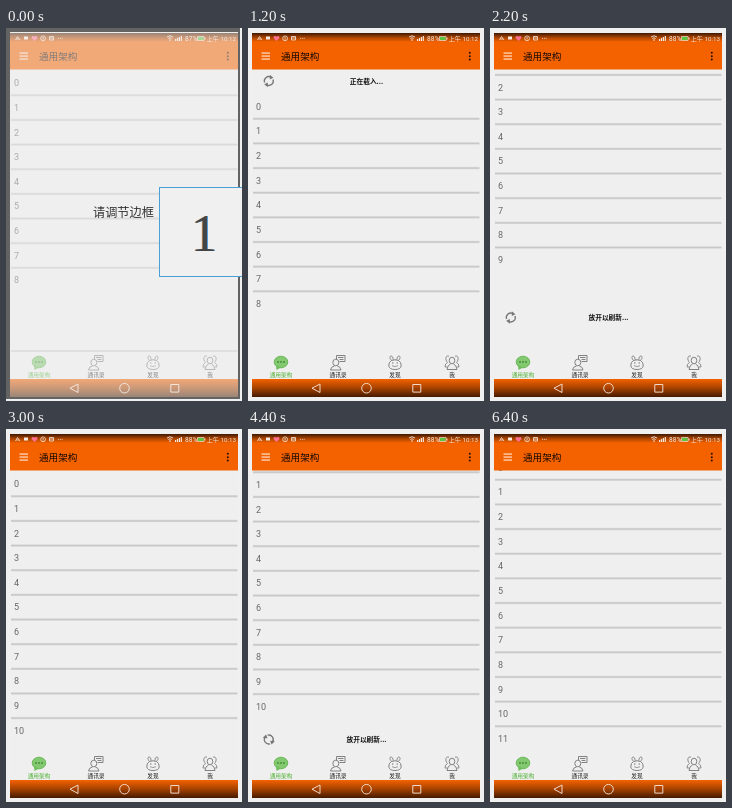
Animation, 236 px wide and 373 px high, one loop 7.2 s. Source, as an HTML page with a canvas:

```html
<!DOCTYPE html>
<html lang="zh">
<head>
<meta charset="utf-8">
<style>
html, body { margin: 0; width: 100%; height: 100%; overflow: hidden; background: #f0f0f0; }
canvas { display: block; width: 236px; height: 373px; }
</style>
</head>
<body>
<canvas id="stage"></canvas>
<script>
const LOOP = 7200, ROW = 24.65, FIRST_ROW = 55;
const TOP = 41, BOTTOM = 323;
const SANS = '"Noto Sans CJK SC", "Noto Sans CJK", "Noto Sans", sans-serif';
const LATIN = 'Roboto, "Noto Sans CJK SC", "Noto Sans CJK", sans-serif';
const HINTS = { pull: '下拉刷新...', release: '放开以刷新...', load: '正在载入...' };

// start time, list shift, row count, hint, edge at which the hint shows
const STEPS = [
  [0, 0, 9],
  [400, 7, 9, 'pull', 'top'],
  [600, 23, 9, 'pull', 'top'],
  [800, 23.5, 9, 'load', 'top'],
  [1400, 0, 10],
  [1800, -24, 10, 'pull', 'bottom'],
  [2000, -38, 10, 'release', 'bottom'],
  [2200, -45, 10, 'release', 'bottom'],
  [2400, 0, 10, 'load', 'bottom'],
  [3000, 0, 11],
  [3400, -9, 11, 'pull', 'bottom'],
  [3800, -18, 11, 'pull', 'bottom'],
  [4400, -24, 11, 'release', 'bottom'],
  [5000, -14.5, 11, 'load', 'bottom'],
  [5400, -16.5, 12]
];

const canvas = document.getElementById('stage');
const ctx = canvas.getContext('2d');
const ratio = window.devicePixelRatio || 1;
canvas.width = 236 * ratio;
canvas.height = 373 * ratio;

function rect(x, y, w, h, color) {
  ctx.fillStyle = color;
  ctx.fillRect(x, y, w, h);
}

function text(str, x, y, size, color, { align = 'left', weight = 400, family = SANS } = {}) {
  ctx.font = `${weight} ${size}px ${family}`;
  ctx.textAlign = align;
  ctx.textBaseline = 'alphabetic';
  ctx.fillStyle = color;
  ctx.fillText(str, x, y);
}

function stroke(path, color, width = 1) {
  ctx.strokeStyle = color;
  ctx.lineWidth = width;
  ctx.stroke(new Path2D(path));
}

function fill(path, color) {
  ctx.fillStyle = color;
  ctx.fill(new Path2D(path));
}

function dot(x, y, r, color) {
  ctx.fillStyle = color;
  ctx.beginPath();
  ctx.arc(x, y, r, 0, 2 * Math.PI);
  ctx.fill();
}

function gradient(y0, y1, ...colors) {
  const g = ctx.createLinearGradient(0, y0, 0, y1);
  colors.forEach((c, i) => g.addColorStop(i / (colors.length - 1), c));
  return g;
}

function drawStatus(t) {
  const white = '#f7e9df';
  rect(4, 5, 228, 9, gradient(5, 14, '#401900', '#a84300', '#f46200'));
  stroke('M9.5 12L11.5 8.5L14 12M10.5 11H13', white, 0.8);
  rect(18, 8.5, 4, 3, white);
  fill('M28.5 13L25.5 10Q25.5 7 28.5 8.5Q31.5 7 31.5 10Z', '#ff6f91');
  stroke('M34.7 10.3a2.4 2.4 0 1 0 4.8 0a2.4 2.4 0 1 0-4.8 0M37.1 9v2.5', white, 0.8);
  stroke('M43.5 8.5h4v3.5h-4zM43.5 10h4', white, 0.8);
  for (let i = 0; i < 3; i++) dot(52.5 + i * 1.8, 10.3, 0.5, white);
  stroke('M161 9Q164 6.5 167 9M162.3 10.5Q164 9 165.7 10.5', white, 0.9);
  dot(164, 12, 0.8, white);
  for (let i = 0; i < 4; i++) rect(169 + i * 1.9, 11 - i, 1.2, 2 + i, white);
  text(t < 800 ? '87%' : '88%', 179, 12.8, 6.6, white, { family: LATIN });
  stroke('M191.5 8.5h6.5v4h-6.5z', white, 0.7);
  rect(192, 9, 5.4, 3, '#59c63d');
  rect(198.4, 9.5, 1, 2, white);
  text(t < 1600 ? '上午 10:12' : '上午 10:13', 230, 12.8, 6.2, white, { align: 'right', family: LATIN });
}

function drawAppBar() {
  rect(4, 14, 228, 27.5, '#f46200');
  for (const y of [24.5, 27.5, 30.5]) rect(13.5, y, 8.5, 1.1, '#ffe9dc');
  text('通用架构', 33, 31.7, 9.6, '#160900');
  for (const y of [24.8, 28.2, 31.6]) dot(221.8, y, 1, '#2b1000');
}

function drawSpinner(x, y, degrees) {
  ctx.save();
  ctx.translate(x, y);
  ctx.rotate(degrees * Math.PI / 180);
  for (let i = 0; i < 2; i++) {
    stroke('M-4.2 1.6A4.5 4.5 0 0 1 2 -4', '#777', 1.3);
    fill('M1 -6.2L4.6 -3.2L1 -1.4Z', '#777');
    ctx.rotate(Math.PI);
  }
  ctx.restore();
}

function drawList(t) {
  const [, shift, rows, hint, edge] = STEPS.findLast(step => step[0] <= t);
  ctx.save();
  ctx.beginPath();
  ctx.rect(4, TOP, 228, BOTTOM - TOP);
  ctx.clip();
  for (let i = 0; i < rows; i++) {
    const y = FIRST_ROW + i * ROW + shift;
    text(i, 8, y + 3.2, 9, '#666', { family: LATIN });
    if (i < rows - 1) rect(5, y + 11, 226.5, 2.4, gradient(y + 11, y + 13.4, '#dedede', '#c6c6c6', '#d6d6d6'));
  }
  if (hint) {
    const loading = hint === 'load';
    const footer = loading ? FIRST_ROW + rows * ROW : BOTTOM + 11.5;
    const y = shift + (edge === 'top' ? TOP - 11.5 : footer);
    const angle = loading ? Math.floor(t / 200) * 60 : Math.abs(shift) * 4;
    drawSpinner(20.8, y, angle);
    text(HINTS[hint], 118.5, y + 2.5, 6.7, '#111', { align: 'center', weight: 700 });
  }
  ctx.restore();
}

function drawTabs() {
  const gray = '#777';
  ctx.fillStyle = '#82c970';
  ctx.beginPath();
  ctx.ellipse(33, 334, 6.8, 5.8, 0, 0, 2 * Math.PI);
  ctx.fill();
  ctx.strokeStyle = '#5aae46';
  ctx.lineWidth = 0.8;
  ctx.stroke();
  fill('M28 337L28.5 342L33 339.5Z', '#6fbd5c');
  for (const x of [30, 33, 36]) dot(x, 334, 1, '#4a8f3b');

  stroke('M84.8 334.5a3 3.3 0 1 0 6 0a3 3.3 0 1 0-6 0M82.5 342Q83 338.5 86.5 338M89.3 338Q92.5 338.5 93 342H82.5', gray, 0.9);
  stroke('M88.5 331V327.5H97V333.5H91.5M90 329.5H95.5M91.5 331.5H95.5', gray, 0.9);

  stroke('M143.5 332.5Q140.5 334 140.8 338Q141.5 341.5 147 341.5Q152.5 341.5 153.2 338Q153.5 334 150.5 332.5Q147 331 143.5 332.5', gray, 0.9);
  stroke('M143.5 332.5Q140.5 329 143 327.8Q145 328 145.3 331.8M150.5 332.5Q153.5 329 151 327.8Q149 328 148.7 331.8', gray, 0.8);
  stroke('M144 337.7Q147 339.5 150 337.7', gray, 0.7);
  for (const x of [144.8, 149.2]) dot(x, 335, 0.7, gray);

  stroke('M201.2 332.5a2.8 3.3 0 1 0 5.6 0a2.8 3.3 0 1 0-5.6 0M199 341.5Q199.5 337 202.5 336M205.5 336Q208.5 337 209 341.5H199', gray, 0.9);
  stroke('M201 328.2Q198 327 197.8 331Q198.5 334 199.5 334.5Q197 335.5 197 339H199M207 328.2Q210 327 210.2 331Q209.5 334 208.5 334.5Q211 335.5 211 339H209', gray, 0.8);

  ['通用架构', '通讯录', '发现', '我'].forEach((label, i) =>
    text(label, 33 + 57 * i, 349, 5.7, i ? '#222' : '#4caf2f', { align: 'center', weight: 500 }));
}

function drawNavBar() {
  rect(4, 351, 228, 18, gradient(351, 369, '#f46200', '#a64200', '#451a00'));
  const pale = '#f3d9c8';
  stroke('M72 356V364.5L64 360.2Z', pale);
  stroke('M113.7 360.2a4.8 4.8 0 1 0 9.6 0a4.8 4.8 0 1 0-9.6 0', pale);
  stroke('M164.8 356.5h8v7.6h-8z', pale);
}

function drawIntro() {
  rect(4, 4, 228, 365, 'rgba(240,240,240,.5)');
  const edge = '#636363';
  rect(0, 0, 234, 4, edge);
  rect(0, 369, 234, 2, edge);
  rect(0, 0, 4, 371, edge);
  rect(232, 0, 2, 371, edge);
  text('请调节边框', 87, 188.5, 12.2, '#333');
  rect(153, 159, 83, 90, '#4a9fd6');
  rect(154, 160, 82, 88, '#f0f0f0');
  const digit = { align: 'center', family: '"Liberation Serif", serif' };
  text('1', 197.3, 223, 52, '#e0a060', digit);
  text('1', 198.9, 223, 52, '#4c94d0', digit);
  text('1', 198.1, 223, 52, '#444', digit);
}

function draw(now) {
  const t = now % LOOP;
  ctx.setTransform(ratio, 0, 0, ratio, 0, 0);
  rect(0, 0, 236, 373, '#f0f0f0');
  rect(4, 5, 228, 364, '#efefef');
  drawList(t);
  drawStatus(t);
  drawAppBar();
  if (t < 800) rect(5, 322, 226.5, 2, '#cfcfcf');
  drawTabs();
  drawNavBar();
  if (t < 200) drawIntro();
}

const start = performance.now();
function tick() {
  draw(performance.now() - start);
  requestAnimationFrame(tick);
}
tick();
</script>
</body>
</html>
```
